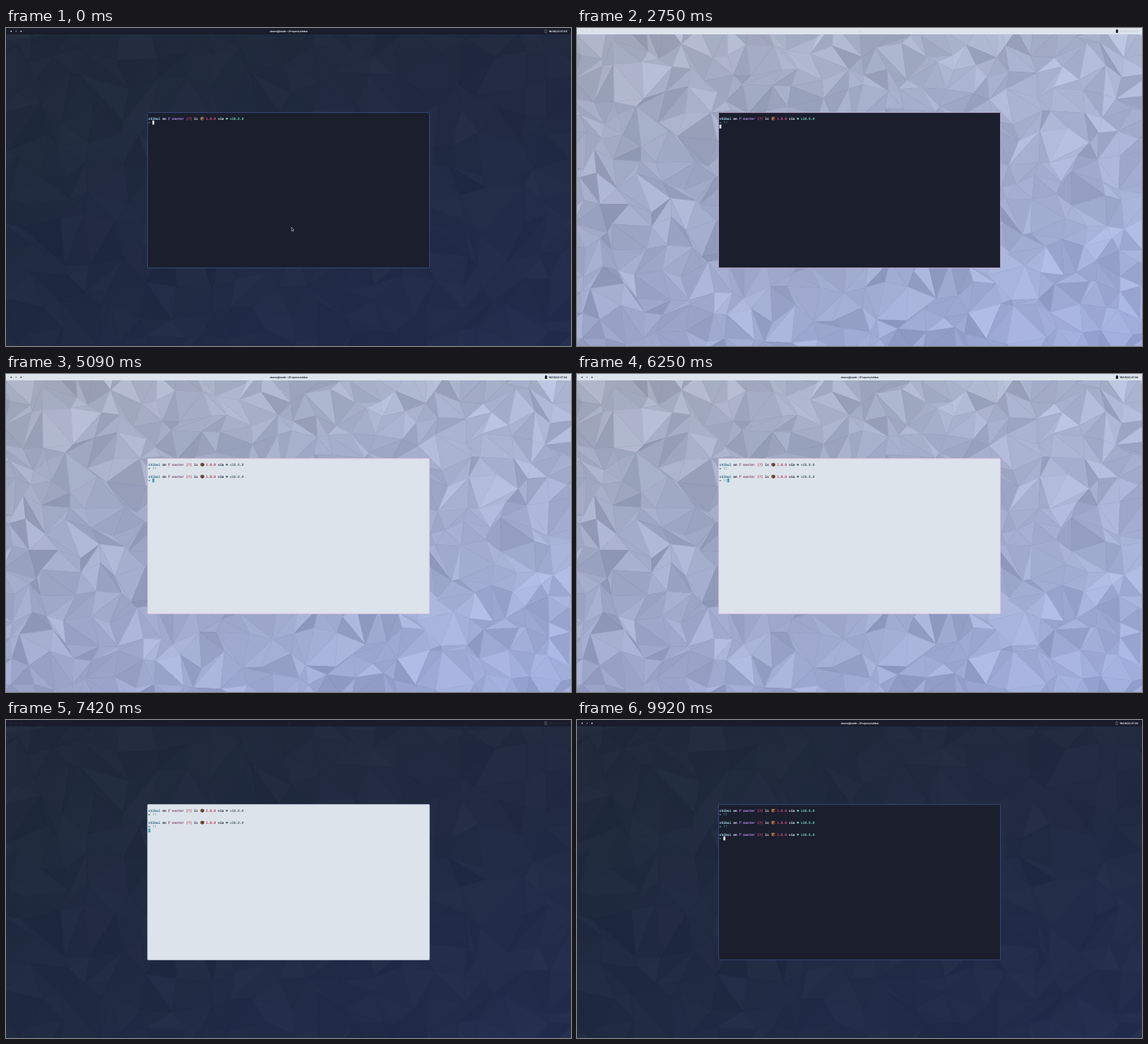
An HTML page with a canvas that plays this animation: 800x450 px, repeating every 10 s.

```html
<!DOCTYPE html>
<html lang="en">
<head>
<meta charset="utf-8">
<title>Theme toggle</title>
<style>
html, body { margin: 0; width: 100%; height: 100%; overflow: hidden; background: #222c46; }
canvas, svg { position: absolute; left: 0; top: 0; width: 800px; height: 450px; display: block; }
text { text-rendering: geometricPrecision; white-space: pre; }
#bar text { font: 700 3.5px Inter, Roboto, sans-serif; fill: currentColor; }
#term text { font: 700 4.67px "DejaVu Sans Mono", "Liberation Mono", monospace; }

#bar { --back: #1a1c2b; }
#bar.light { --back: #dce3eb; }
#bar > rect { fill: var(--back); }

#term {
  --back: #1a1e2d; --plain: #e6e9f5; --dir: #a5dcf0; --branch: #b48af0;
  --alert: #f0508c; --node: #73dac4; --typed: #3f96a4; --arrow: #5f8f9a;
  --cursor: #e4e8f2; --box: #a9744f;
}
#term.light {
  --back: #dce3ea; --plain: #23283a; --dir: #2c6f82; --branch: #8a4a72;
  --alert: #bd2f4c; --node: #4c6168; --typed: #7595ac; --arrow: #4f6a72;
  --cursor: #3fa3ad; --box: #7a4636;
}
#frame { fill: var(--back); }
.plain { fill: var(--plain); }
.dir { fill: var(--dir); }
.branch { fill: var(--branch); }
.alert { fill: var(--alert); }
.node { fill: var(--node); }
.typed { fill: var(--typed); }
</style>
</head>
<body>
<canvas id="wallDark" width="800" height="450"></canvas>
<canvas id="wallLight" width="800" height="450"></canvas>
<svg viewBox="0 0 800 450">
  <g id="bar">
    <rect width="800" height="9"/>
    <g fill="currentColor">
      <circle cx="7.3" cy="4.6" r=".95"/>
      <circle cx="14.3" cy="4.6" r=".8" opacity=".7"/>
      <circle cx="21.3" cy="4.6" r=".95"/>
    </g>
    <text id="title" x="400.3" y="5.8" text-anchor="middle"></text>
    <path id="trayDark" d="M763 2.6h2.4v4h-2.4z" fill="none" stroke="#8b90a2" stroke-width=".5"/>
    <path id="trayLight" d="M764 1.8h1.2l1 1.8v2.6l-.7.9h-1.8l-.7-.9v-2.6z" fill="#1c2030"/>
    <text id="clock" x="794.6" y="5.8" text-anchor="end"></text>
  </g>
  <g id="term">
    <rect id="frame" x="200.4" y="119.6" width="399.2" height="219.8" rx="1" stroke-width=".8"/>
    <g id="prompts"></g>
    <rect id="cursor" width="2.8" height="5.5" fill="var(--cursor)"/>
  </g>
  <path id="mouse" d="M404.2 282.2v5l1.2-1 .8 1.6.9-.4-.8-1.6h1.5z" fill="#11131c" stroke="#e8eaf0" stroke-width=".5"/>
</svg>
<script>
const LOOP = 10000;
const DESKTOP_LIGHT = [2750, 7420], TERM_LIGHT = [4340, 9050];
const RUNS = [
  { keys: [90, 420], enter: 2170, done: 3650 },
  { keys: [5700, 5950], enter: 6880, done: 8320 }
];
const CELL = 2.812, ROW = 5.63, LEFT = 201.6, TOP = 125.4;
const SHELL_TITLE = "denvo@baldr:~/Projects/shibui";
const el = id => document.getElementById(id);
const within = (t, [from, to]) => t >= from && t < to;

function random(seed) {
  return () => (seed = (seed * 16807) % 2147483647) / 2147483647;
}

// Low-poly mosaic: a jittered grid split into triangles over a four-corner gradient.
function paintWall(canvas, seed, cell, contrast, corners) {
  const c = canvas.getContext("2d"), rnd = random(seed);
  const cols = Math.ceil(800 / cell) + 3, rows = Math.ceil(450 / cell) + 3;
  const pts = Array.from({ length: rows }, (_, j) => Array.from({ length: cols }, (_, i) =>
    [(i - 1 + (rnd() - .5) * .9) * cell, (j - 1 + (rnd() - .5) * .9) * cell]));
  const tone = (x, y, shade) => {
    const u = Math.min(1, Math.max(0, x / 800)), v = Math.min(1, Math.max(0, y / 450));
    const [tl, tr, bl, br] = corners;
    return "rgb(" + tl.map((_, k) => Math.round(shade +
      (tl[k] * (1 - u) + tr[k] * u) * (1 - v) + (bl[k] * (1 - u) + br[k] * u) * v)) + ")";
  };
  const triangle = (...p) => {
    const x = (p[0][0] + p[1][0] + p[2][0]) / 3, y = (p[0][1] + p[1][1] + p[2][1]) / 3;
    c.fillStyle = c.strokeStyle = tone(x, y, (rnd() + rnd() - 1) * contrast);
    c.lineWidth = .6;
    c.beginPath();
    p.forEach(q => c.lineTo(...q));
    c.closePath();
    c.fill();
    c.stroke();
  };
  for (let j = 0; j < rows - 1; j++) for (let i = 0; i < cols - 1; i++) {
    const a = pts[j][i], b = pts[j][i + 1], d = pts[j + 1][i], e = pts[j + 1][i + 1];
    if (rnd() < .5) { triangle(a, b, d); triangle(b, e, d); }
    else { triangle(a, b, e); triangle(a, e, d); }
  }
}

function promptMarkup(index) {
  const y = TOP + ROW * index * 3;
  const at = col => LEFT + CELL * col;
  const words = [
    [0, "dir", "shibui"], [7, "plain", "on"], [12, "branch", "master"], [19, "alert", "[?]"],
    [23, "plain", "is"], [29, "alert", "1.0.0"], [35, "plain", "via"], [41, "node", "v18.8.0"]
  ];
  const text = words.map(([col, kind, word]) =>
    `<text class="${kind}" x="${at(col)}" y="${y + 4.4}">${word}</text>`).join("");
  return `<g class="prompt">${text}
    <path transform="translate(${at(10)} ${y})" d="M.7.8v4.2M2.5 1v1L.7 3.4" fill="none" stroke="var(--branch)" stroke-width=".7"/>
    <g transform="translate(${at(26) + 3.1} ${y + 2.8})">
      <path d="M0-2.7 2.5-1.5v2.8L0 2.7-2.5 1.3v-2.8z" fill="var(--box)"/>
      <path d="M0 0V2.7L2.5 1.3v-2.8z" fill="#5a3828"/>
    </g>
    <circle class="node" cx="${at(39) + 1.5}" cy="${y + 2.9}" r="1.35"/>
    <path transform="translate(${LEFT} ${y + ROW})" d="M.4 2.3 2.6 2.9.4 3.5z" fill="var(--arrow)" stroke="var(--arrow)" stroke-width=".4"/>
    <text class="typed" x="${at(2)}" y="${y + ROW + 4.4}" style="font-weight:400"></text></g>`;
}

function barInk(t) {
  const light = within(t, DESKTOP_LIGHT);
  const since = light ? t - DESKTOP_LIGHT[0] : t - DESKTOP_LIGHT[1];
  const k = since < 0 ? 1 : Math.min(1, since / 200);
  const [from, to] = light ? [[198, 206, 222], [28, 32, 46]] : [[42, 46, 64], [236, 238, 246]];
  return `rgb(${from.map((v, i) => Math.round(v + (to[i] - v) * k))})`;
}

el("prompts").innerHTML = [0, 1, 2].map(promptMarkup).join("");
const prompts = [...document.querySelectorAll(".prompt")];
const typed = prompts.map(p => p.querySelector(".typed"));
const show = (node, on) => { node.style.visibility = on ? "visible" : "hidden"; };

paintWall(el("wallDark"), 71, 40, 4, [[32, 42, 58], [34, 42, 64], [32, 42, 66], [35, 45, 78]]);
paintWall(el("wallLight"), 29, 31, 21, [[164, 171, 190], [170, 179, 206], [157, 167, 203], [157, 170, 216]]);

function draw(t) {
  const light = within(t, DESKTOP_LIGHT), termLight = within(t, TERM_LIGHT);
  show(el("wallLight"), light);
  show(el("trayLight"), light);
  show(el("trayDark"), !light);
  show(el("mouse"), t < RUNS[0].keys[0]);
  el("bar").setAttribute("class", light ? "light" : "");
  el("bar").style.color = barInk(t);
  el("term").setAttribute("class", termLight ? "light" : "");
  el("frame").setAttribute("stroke", light ? "#dab8de" : termLight ? "#c3cddd" : "#41568e");

  const current = RUNS.filter(r => t >= r.done).length;
  const counts = prompts.map((_, i) => RUNS[i] ? RUNS[i].keys.filter(k => t >= k).length : 0);
  prompts.forEach((p, i) => {
    show(p, i <= current);
    typed[i].textContent = "t".repeat(counts[i]);
  });
  const run = RUNS[current];
  const running = run && t >= run.enter;
  const col = running ? 0 : 2 + counts[current];
  el("cursor").setAttribute("x", LEFT + CELL * col);
  el("cursor").setAttribute("y", TOP + ROW * (current * 3 + (running ? 2 : 1)));
  el("title").textContent = run && t >= run.enter + 80 ? "tt" : SHELL_TITLE;
  el("clock").textContent = t < 4000 ? "19/09/22 07:05" : "19/09/22 07:06";
}

function tick() {
  draw(performance.now() % LOOP);
  requestAnimationFrame(tick);
}
tick();
</script>
</body>
</html>
```
